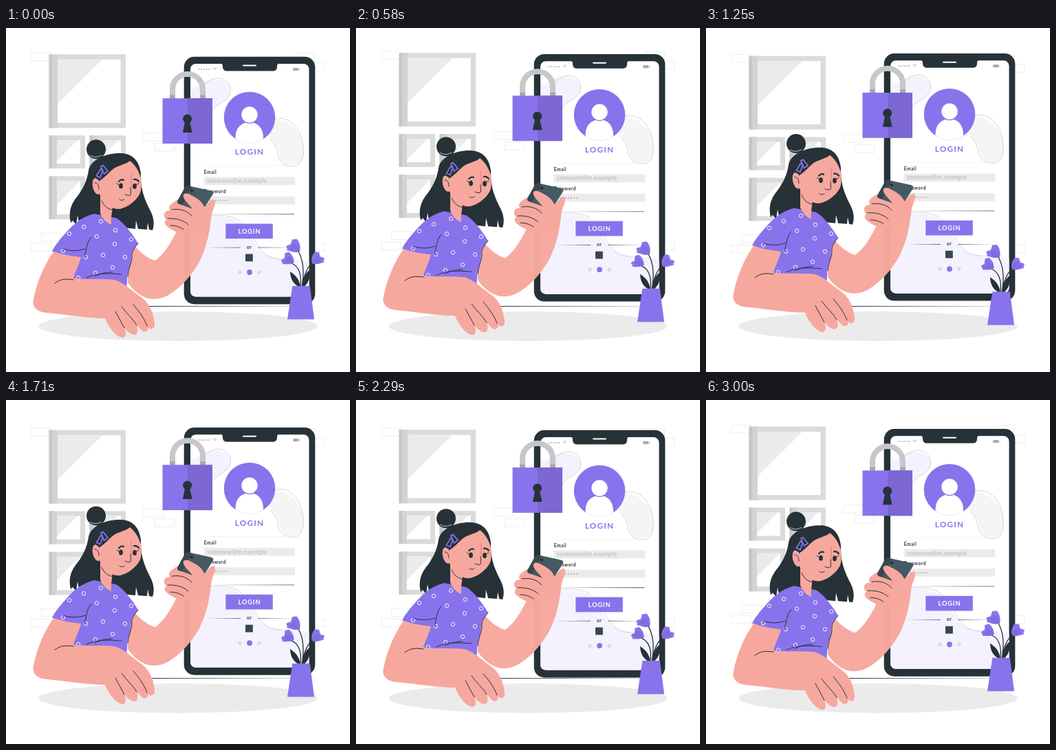
Recreate the animation shown at these times as an HTML page. Size 500 px wide and 500 px high, loop 3.04 s.

```html
<!DOCTYPE html>
<html lang="en">
<head>
<meta charset="utf-8">
<title>Login</title>
<style>
  html, body { margin: 0; width: 100%; height: 100%; overflow: hidden; background: #fff; }
  svg { display: block; width: 100%; height: 100%; }
  text { font-family: Lato, Inter, sans-serif; }
  .purple { fill: #8973ec; }
  .shade { fill: #7c67d3; }
  .dark { fill: #263238; }
  .skin { fill: #f7a89e; }
  .white { fill: #fff; }
  .light { fill: #ebebeb; }
  .line { fill: none; stroke: #263238; stroke-width: 1; stroke-linecap: round; stroke-linejoin: round; }
  .rule { fill: #37474f; }
  .edge { fill: none; stroke: #c9c9cc; stroke-width: .8; }
  .label { font-size: 6.6px; font-weight: 700; letter-spacing: .5px; fill: #263238; }
  .title { font-weight: 700; text-anchor: middle; }
</style>
</head>
<body>
<svg viewBox="0 0 500 500">
  <defs>
    <clipPath id="screen"><rect x="268" y="52" width="172.500" height="338.500" rx="8"/></clipPath>
    <clipPath id="avatar"><circle cx="354" cy="130" r="37.300"/></clipPath>
    <g id="flower">
      <path class="purple" d="M10,9 C12,0 9,-5 6,-9 C3,-10 1,-8 -1,-9 C-2,-6 -2,-3 -4,-1 C-7,-1 -9,0 -10,2 C-8,3 -8,5 -9,7 C-4,8 3,12 10,9Z"/>
      <path class="shade" d="M10,9 C9,2 5,-2 1,-4 C0,-1 -1,2 -5,4 C-1,8 4,10 10,9Z" opacity=".6"/>
    </g>
  </defs>

  <ellipse class="light" cx="250" cy="433.500" rx="202.500" ry="21.500"/>
  <path class="dark" d="M204,404.100 L462,404.500 L204,405Z"/>

  <g id="wall">
    <g id="bricks" fill="none" stroke="#ececec" stroke-width=".9"></g>
    <g id="windows"></g>
  </g>

  <g id="phone">
    <rect class="dark" x="258.700" y="41.800" width="190.600" height="359.600" rx="15"/>
    <rect class="white" x="268" y="52" width="172.500" height="338.500" rx="8"/>
    <g clip-path="url(#screen)">
      <path fill="#f4f2fe" d="M260,88 C276,92 284,75 300,75 C318,74 330,84 326,96 C321,108 309,108 302,118 C292,132 276,128 260,130Z"/>
      <path class="edge" d="M280,90 C290,82 296,73 308,73 C321,73 329,84 326,95 C321,108 309,108 300,120"/>
      <path fill="#f5f5f5" d="M376,140 C394,126 416,138 427,156 C436,174 434,194 424,198 C410,203 398,195 397,182 C396,168 380,165 376,140Z"/>
      <path class="edge" d="M388,134 C404,126 422,137 429,158 C434,174 434,195 423,200 C409,204 396,196 395,182 C394,173 390,168 384,162"/>
      <path fill="#f4f2fe" d="M260,283 C285,270 322,271 336,281 C352,292 355,306 368,322 C384,340 412,332 450,342 V395 H260Z"/>
      <path class="edge" d="M268,280 C288,270 324,269 339,280 C355,291 360,310 373,325 C381,334 391,336 402,336"/>
    </g>
    <path class="dark" d="M310,51 H399 C395,51 394,53 394,56 C394,60 392,62.500 388,62.500 H321 C317,62.500 315,60 315,56 C315,53 314,51 310,51Z"/>
    <path d="M345,54.500H363" stroke="#fff" stroke-width="2" stroke-linecap="round"/>
    <path d="M280.500,60H297" stroke="#aaa" stroke-width="2" stroke-dasharray="0 3.700" stroke-linecap="round"/>
    <path d="M300.500,59 Q303.500,56.500 306.500,59 M302,60.600 Q303.500,59.300 305,60.600" fill="none" stroke="#aaa" stroke-width=".8"/>
    <path d="M417.500,58.300 H425 V61.700 H417.500Z M427,58.500 V61.500" fill="#aaa" stroke="#aaa" stroke-width=".7"/>

    <circle class="purple" cx="354" cy="130" r="37.300"/>
    <g class="white" clip-path="url(#avatar)">
      <path d="M333.500,170 V158 C334,144 343,137 354,137 C365,137 373,144 374,158 V170Z"/>
      <circle class="purple" cx="354" cy="126" r="13"/>
      <circle cx="354" cy="126" r="11.700"/>
    </g>
    <text class="title purple" x="354" y="184.500" font-size="11.700" letter-spacing="1.250">LOGIN</text>
    <path d="M290,200.500H418" stroke="#eee" stroke-width=".7"/>
    <text class="label" x="287.700" y="211.700">Email</text>
    <rect class="light" x="287.500" y="216.500" width="132.700" height="11.800"/>
    <text x="292" y="225.300" font-size="8.700" letter-spacing=".25" fill="#b3b3b3">someone@m.example</text>
    <text class="label" x="287.700" y="240">Password</text>
    <rect class="light" x="287.500" y="244.800" width="132.700" height="11.600"/>
    <path d="M293,250.800H322" stroke="#b0b0b0" stroke-width="2" stroke-dasharray="0 4" stroke-linecap="round"/>
    <path class="rule" d="M288,270.700 L419,270.200 V271.100Z M290,319.100 L341,318.700 V319.500Z M418,319.100 L366,318.700 V319.500Z"/>
    <rect class="purple" x="319.300" y="284.500" width="68.500" height="21.700"/>
    <text class="title white" x="354" y="298.600" font-size="9.200" letter-spacing=".9">LOGIN</text>
    <text class="label" x="350" y="321">or</text>
    <rect x="348" y="328.500" width="10.800" height="10.800" fill="#37474f"/>
    <circle cx="340" cy="355" r="2.600" fill="#dbdbdb"/>
    <circle class="purple" cx="354" cy="355" r="3.900"/>
    <circle cx="368" cy="355" r="2.600" fill="#dbdbdb"/>
  </g>

  <g id="lock">
    <path d="M242,103V89a22,22 0 0 1 44,0V103" fill="none" stroke="#c7c7c7" stroke-width="8"/>
    <path d="M238,97.500h8v5h-8z M282,97.500h8v5h-8z" fill="#a8a8a8"/>
    <rect class="purple" x="227.500" y="102.200" width="72.500" height="65.800"/>
    <rect class="shade" x="264" y="102.200" width="36" height="65.800"/>
    <circle class="dark" cx="263.600" cy="132" r="6.500"/>
    <path class="dark" d="M260.500,134h6l4,18h-13.500z"/>
  </g>

  <g id="girl">
    <!-- hair behind -->
    <circle class="dark" cx="131" cy="176.300" r="14"/>
    <path d="M122,185 Q129,190 139,185" fill="none" stroke="#fff" stroke-width=".7"/>
    <path class="dark" d="M120,207 C123,191 146,181 168,182 C186,183 196,196 196,216 C196,238 203,252 210,266 C215,276 216,285 213,294 L208,293 L206,283 L205,293 L192,292 L189,280 L188,292 L150,288 L107,287 L104,272 L102,286 L97,280 L94,283 C91,270 93,259 101,248 C111,236 118,222 120,207Z"/>

    <!-- raised arm -->
    <path class="skin" opacity=".975" d="M176,316 L187,317 C196,327 207,336 217,338 C228,330 236,318 243,305 C247,298 249,292 251,288 L284,262 L298,266 C298,292 292,318 281,340 C268,362 254,377 238,387 C219,399 196,397 177,370Z"/>
    <path class="skin" d="M262,247 C254,247 247,250 241,255 C236,259 236,263 239,265 C232,265 229,269 230,273 C230,276 232,278 234,278 C229,280 230,286 235,289 C240,293 247,297 254,298 L295,297 L299,268 L292,258Z"/>
    <path fill="#455a64" d="M266,229.500 L298,236.500 Q303,238 300.500,242 L286,265 Q284,268 280,266 L252,256 Q247,254 250,250 L260,232 Q262,228.500 266,229.500Z"/>
    <path fill="#37474f" d="M263,230 L270,230.700 L256,257 L252,256 Q247,254 250,250 L260,232Z"/>
    <circle class="dark" cx="270" cy="236.500" r="2.300"/>
    <path class="skin" d="M258,246 C256,241 262,239 267,242 C278,247 286,253 288,260 C293,258 296,249 302,249 C306,251 303,260 301,264 C298,272 298,278 297,285 L268,285 C271,274 274,268 272,264 C268,258 260,252 258,246Z"/>
    <path class="line" d="M241,264 C252,262 263,265 270,273 M235,277 C246,276 258,279 265,286 M239,287 C246,287 253,289 258,293"/>

    <!-- shirt -->
    <path class="purple" d="M128,270 C108,275 96,287 84,301 C76,310 70,318 67,324.500 C80,329 92,332 105,333 L90,368 L175,378 C177,367 175,358 179,349 C183,340 181,331 183,325 L192,313 C184,300 173,284 160,276Z"/>
    <path class="purple" d="M105,320 L116,322 L114,333 L104,333Z"/>
    <g id="dots" fill="none" stroke="#fff" stroke-width=".9"></g>
    <path class="line" d="M124,304 C117,311 117,323 114,333 M83,321 C95,325 106,324 115,321 M192,313 C187,319 182,325 183,333 C183,342 178,348 177,361 M117,363 C130,357 142,356 168,358 M129,361 C139,356 148,355 155,355"/>

    <!-- resting arm -->
    <path class="skin" d="M69,325 C84,330 98,332 109,333 C106,345 100,355 98,364 C118,366 142,364 158,366 C172,370 184,383 196,391 C207,398 214,412 216,429 C217,437 211,440 206,435 C208,440 202,444 198,440 C194,437 192,434 190,431 C193,440 191,447 186,446 C180,445 175,440 172,435 C175,443 175,450 169,450 C160,449 149,435 144,422 C117,422 84,416 60,414 C45,413 37,405 40,394 C45,369 55,345 69,325Z"/>
    <path class="line" d="M71,371 C79,365 86,364 98,366 M159,412 L172,436 M168,405 C175,415 184,422 190,432 M185,402 C192,410 200,420 205,433"/>

    <!-- head -->
    <path class="skin" d="M137,240 L137,269 C140,277 146,283 153,286 C152,278 154,270 155,258Z"/>
    <ellipse class="skin" cx="132" cy="230" rx="6" ry="12" transform="rotate(-12 132 230)"/>
    <path class="line" d="M129,225 C133,224 135,229 135,234 M139,251 C143,260 149,264 158,265"/>
    <path class="skin" d="M136,222 C145,218 150,200 180,192 C188,198 193,207 196,217 C197,229 197,237 194,242 C189,251 178,260 166,263 C152,264 140,254 136,241Z"/>
    <path class="dark" d="M131,219 C141,224 148,210 157,204 C165,199 175,198 180,193 C187,198 193,207 196,218 C197,200 187,188 169,186 C148,184 130,200 131,219Z"/>
    <path d="M182,212 V233" fill="none" stroke="#d9776c" stroke-width=".9"/>
    <path class="line" d="M181,232 L181.500,242 Q179,245 173,242"/>
    <path class="line" style="stroke-width:2.200" d="M164,223 Q168,219 171,221 M186,220 Q190,219 193,223"/>
    <ellipse class="dark" cx="167" cy="229.500" rx="2.900" ry="4"/>
    <ellipse class="dark" cx="187" cy="230" rx="2.900" ry="4"/>
    <path class="line" d="M164,228 L161,226 M189,228 L193,226 M165,249 Q168,252 172,249"/>
    <path d="M131.500,215 L137.500,205 L140.500,207 L137,217.500Z M138,201 L141,199.500 L148,208 L142.500,212Z" fill="none" stroke="#8973ec" stroke-width="1.700"/>
  </g>

  <g id="vase">
    <g class="line" style="stroke-width:1.300">
      <path d="M430,377 C434,354 432,337 425,325 M428,377 C430,358 425,346 415,342 M431,377 C432,360 438,347 446,341"/>
    </g>
    <path class="dark" d="M428,377 C418,374 413,364 413,354 C421,359 427,366 428,377Z M432,377 C431,366 434,357 441,352 C443,362 440,371 432,377Z"/>
    <use href="#flower" x="417" y="316"/>
    <use href="#flower" transform="translate(408 335) rotate(-14) scale(.9)"/>
    <use href="#flower" transform="translate(454 334) scale(-.92 .92)"/>
    <path class="purple" d="M416.300,375H441.700L448,423.500H409Z"/>
  </g>
</svg>
<script>
  const LOOP = 3040, RISE = 10;
  const byId = id => document.getElementById(id);

  byId('bricks').innerHTML = [[37, 36], [200, 152.500], [216, 167.500], [52, 298], [37, 313], [420, 36.500], [434.500, 50.500], [434.500, 313]]
    .map(([x, y]) => `<rect x="${x}" y="${y}" width="28.500" height="11.500"/>`).join('');

  // Window frame with a lit pane; glare is the size of the diagonal reflection.
  function pane(x, y, w, h, side, rim, glare) {
    const left = x + side, top = y + rim;
    return `<rect x="${x}" y="${y}" width="${w}" height="${h}" fill="#dbdbdb"/>
      <rect x="${x}" y="${y}" width="5" height="${h}" fill="#c7c7c7"/>
      <rect x="${x + 5}" y="${y}" width="${side - 5}" height="${h}" fill="#d3d3d3"/>
      <rect x="${left}" y="${top}" width="${w - side - rim}" height="${h - 2 * rim}" fill="#fff"/>
      <path d="M${left},${top}h${glare}l${-glare},${glare}z" fill="#ebebeb"/>`;
  }
  byId('windows').innerHTML =
    pane(62.500, 38.300, 111.500, 107, 12.500, 7.500, 65) +
    [62.500, 121.500].map(x =>
      pane(x, 156.200, 52.500, 48, 11.500, 7, 30) + pane(x, 215.500, 52.500, 62.500, 11.500, 7, 34)).join('');

  byId('dots').innerHTML = [[113, 289], [92, 299], [138, 281], [132, 303], [159, 294], [83, 324], [116, 333], [141, 330],
    [173, 333], [158, 314], [130, 356], [155, 348], [105, 363], [182, 307]]
    .map(([x, y]) => `<circle cx="${x}" cy="${y}" r="2.700"/>`).join('');

  // Linear bob: distance below the highest point, which is reached at time `peak`.
  function depth(time, peak) {
    const gap = Math.abs(time - peak) % LOOP;
    return RISE * Math.min(gap, LOOP - gap) / (LOOP / 2);
  }
  const parts = [['wall', 450, 1], ['phone', 990, 1], ['lock', 1455, 1], ['girl', 1455, 1], ['vase', 1455, -1]];
  const start = performance.now();

  function draw() {
    const time = Math.max(0, performance.now() - start) % LOOP;
    for (const [id, peak, sign] of parts) {
      const shift = sign * (depth(time, peak) - depth(0, peak));
      byId(id).setAttribute('transform', `translate(0 ${shift.toFixed(2)})`);
    }
    requestAnimationFrame(draw);
  }
  draw();
</script>
</body>
</html>
```
